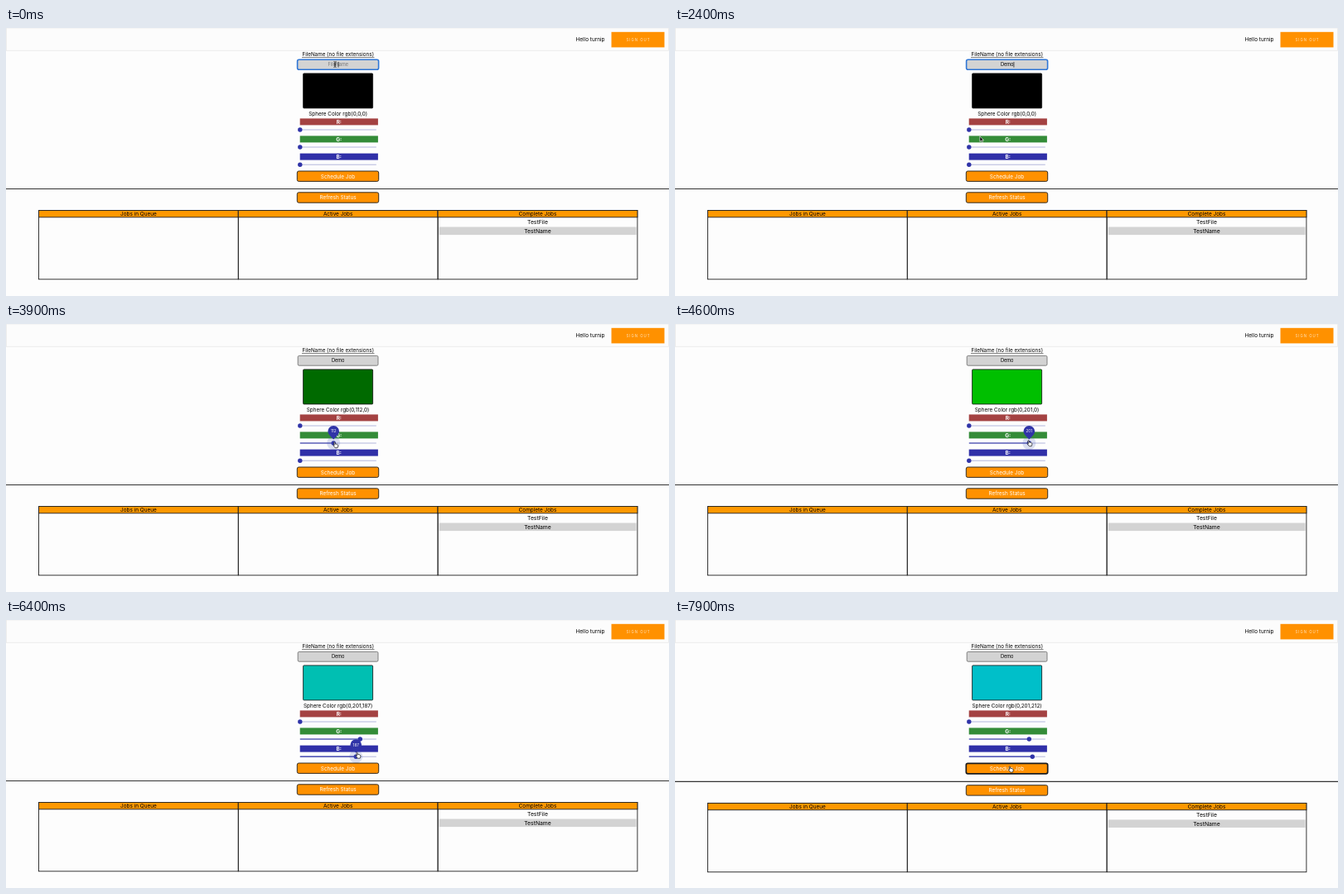
Recreate the animation shown at these times as an HTML page. Size 800x324 px, loop 8 s.

```html
<!DOCTYPE html>
<html lang="en">
<head>
<meta charset="utf-8">
<title>Job scheduler</title>
<style>
html, body { margin: 0; width: 100%; height: 100%; overflow: hidden; background: #fdfdfd; }
svg { display: block; width: 800px; height: 324px; font-family: Inter, "Open Sans", sans-serif; }
</style>
</head>
<body>
<svg id="stage" viewBox="0 0 800 324"></svg>
<script>
const stage = document.getElementById('stage');
const LOOP = 8000, STEP = 100;
const BLUE = '#3034a8', ORANGE = '#ff9100';

// Keyframes: [time, value, ...]
const greenKeys = [[3000, 0], [3900, 112], [4600, 201]];
const blueKeys = [[5400, 0], [5500, 9], [6400, 187], [7000, 212]];
const pointerKeys = [
  [1800, 398, 42], [2400, 367.8, 131], [2700, 355.5, 142], [3000, 355.5, 142.5],
  [3900, 396.3, 142.5], [4600, 426.5, 140.5], [4800, 427, 141], [5200, 356, 162],
  [5500, 357.6, 163.5], [6400, 423.5, 160], [7000, 431.5, 162], [7200, 431.5, 163],
  [7600, 403.8, 176.8]
];

function tween(keys, t) {
  if (t <= keys[0][0]) return keys[0].slice(1);
  for (let i = 1; i < keys.length; i++) {
    const a = keys[i - 1], b = keys[i];
    if (t <= b[0]) {
      const p = (t - a[0]) / (b[0] - a[0]);
      return a.slice(1).map((v, k) => v + (b[k + 1] - v) * p);
    }
  }
  return keys[keys.length - 1].slice(1);
}

const rect = (x, y, w, h, fill, more = '') =>
  `<rect x="${x}" y="${y}" width="${w}" height="${h}" fill="${fill}" ${more}/>`;
const line = (x1, y1, x2, y2, color, width) =>
  `<path d="M${x1} ${y1}L${x2} ${y2}" stroke="${color}" stroke-width="${width}"/>`;
const circle = (x, y, r, fill, more = '') =>
  `<circle cx="${x}" cy="${y}" r="${r}" fill="${fill}" ${more}/>`;
const text = (s, x, cy, size = 6.4, fill = '#000', more = '') =>
  `<text x="${x}" y="${cy + size * 0.36}" font-size="${size}" fill="${fill}" text-anchor="middle" ${more}>${s}</text>`;

function button(label, y, strong) {
  return rect(351.3, y, 98.4, 12.4, ORANGE, `rx="2" stroke="#1c1c1c" stroke-width="${strong ? 1.7 : 0.9}"`) +
    text(label, 400.5, y + 6.2, 6.4, '#fff');
}

function header() {
  return rect(0.5, 0, 799, 27.3, '#fcfcfc', 'stroke="#e9e9e9" stroke-width=".8"') +
    text('Hello turnip', 705, 13.7) +
    rect(730.5, 4.8, 64, 18.6, ORANGE) +
    text('SIGN OUT', 763, 14.2, 4.3, '#ffe6c4', 'letter-spacing="1.05"');
}

function nameField(t) {
  const typed = [600, 800, 900, 1100].filter(at => t >= at).length;
  const focused = t < 3000;
  const caretOn = t < 300 || (t >= 600 && t < 1400) || (t >= 1900 && t < 2500);
  let s = text('FileName (no file extensions)', 400.7, 32, 6.3) +
    line(357, 35.6, 444.5, 35.6, '#222', 0.6);
  s += focused
    ? rect(351.6, 38.3, 98, 12, '#d3d3d3', 'rx="2" stroke="#2f76d6" stroke-width="1.6"')
    : rect(352.2, 38.4, 96.8, 11.8, '#d3d3d3', 'rx="1.5" stroke="#666" stroke-width=".8"');
  s += typed ? text('Demo'.slice(0, typed), 400.7, 44.3, 5.6) : text('FileName', 400.8, 44.3, 5.5, '#777');
  if (focused && caretOn) {
    const x = 401 + [0, 2, 3.6, 6.1, 7.9][typed];
    s += line(x, 41, x, 47.6, '#111', 0.7);
  }
  return s;
}

function slider(name, color, y, value) {
  const x = 354.8 + value / 255 * 92;
  return rect(354.7, y - 13.6, 94.2, 8, color) +
    text(name + ':', 401.8, y - 9.5, 6.4, '#fff', 'font-weight="700"') +
    line(354.8, y, 446.8, y, '#b2b6dc', 1) +
    line(354.8, y, x, y, BLUE, 1.2) +
    circle(x, y, 2.7, BLUE);
}

function balloon(y, value) {
  const x = 354.8 + value / 255 * 92;
  return circle(x, y, 8, '#3f51b5', 'opacity=".18"') +
    `<path d="M${x} ${y - 4.6}l-4.8 -4.8a6.8 6.8 0 1 1 9.6 0z" fill="${BLUE}"/>` +
    text(Math.round(value), x, y - 14.2, 4.6, '#fff');
}

function jobs(dy) {
  const frame = 'stroke="#222" stroke-width=".9"';
  let s = line(0, 194.5, 800, 194.5, '#333', 1.1) + button('Refresh Status', 198.8) +
    rect(522.6, 240.5, 238, 9.6, '#d3d3d3') +
    text('TestFile', 641.5, 234.8, 6.8) + text('TestName', 641.5, 245.3, 6.8);
  ['Jobs in Queue', 'Active Jobs', 'Complete Jobs'].forEach((title, i) => {
    const x = 39.5 + i * 240.8;
    s += rect(x, 220.5, 240.8, 83.3, 'none', frame) +
      rect(x, 220.5, 240.8, 8.3, '#ff9800', frame) +
      text(title, x + 120.4, 224.8);
  });
  return `<g transform="translate(0 ${dy})">${s}</g>`;
}

const cursors = {
  beam: '<path d="M-2.6 -1.5q1.6 0 1.6 1v5q0 1 -1.6 1M.6 -1.5q-1.6 0 -1.6 1v5q0 1 1.6 1M-2 2h2" fill="none" stroke="#222" stroke-width=".7"/>',
  arrow: '<path d="M0 0v6.4l1.5 -1.3l1 2.2l1.2 -.5l-1 -2.2h2z" fill="#111" stroke="#fff" stroke-width=".6"/>',
  hand: '<path d="M-.6 .5q.6 -1 1.2 0l.3 2.1q2.6 -.3 3.4 1.2q.3 1.6 -.6 3.4h-2.9q-1 -1.6 -2.3 -3q.4 -1 1.4 0z" fill="#fff" stroke="#111" stroke-width=".7" stroke-linejoin="round"/>'
};

function pointer(t) {
  if (t >= 600 && t < 1800) return '';
  const [x, y] = tween(pointerKeys, t);
  const onSlider = (t >= 2700 && t < 4900) || (t >= 5200 && t < 7300);
  const kind = y < 50 ? 'beam' : onSlider || t >= 7500 ? 'hand' : 'arrow';
  return `<g transform="translate(${x} ${y})">${cursors[kind]}</g>`;
}

function draw(t) {
  const g = Math.round(tween(greenKeys, t)[0]);
  const b = Math.round(tween(blueKeys, t)[0]);
  const pressed = t >= 7600;
  const shade = v => Math.round(v * 0.95);
  stage.innerHTML = header() + nameField(t) +
    rect(358.6, 54.9, 84, 42, `rgb(0,${shade(g)},${shade(b)})`, 'rx="1" stroke="#111" stroke-width=".8"') +
    text(`Sphere Color rgb(0,${g},${b})`, 400.6, 103.6, 6.35) +
    slider('R', '#a44242', 123, 0) +
    slider('G', '#348c38', 144, g) +
    slider('B', '#3030a8', 165.2, b) +
    (t >= 2700 && t < 4800 ? balloon(144, g) : '') +
    (t >= 5200 && t < 7300 ? balloon(165.2, b) : '') +
    button('Schedule Job', pressed ? 173.4 : 173, pressed) +
    jobs(pressed ? 0.9 : 0) + pointer(t);
}

let shown = -1;
function tick() {
  const t = Math.floor(performance.now() % LOOP / STEP) * STEP;
  if (t !== shown) draw(shown = t);
  requestAnimationFrame(tick);
}
tick();
</script>
</body>
</html>
```
